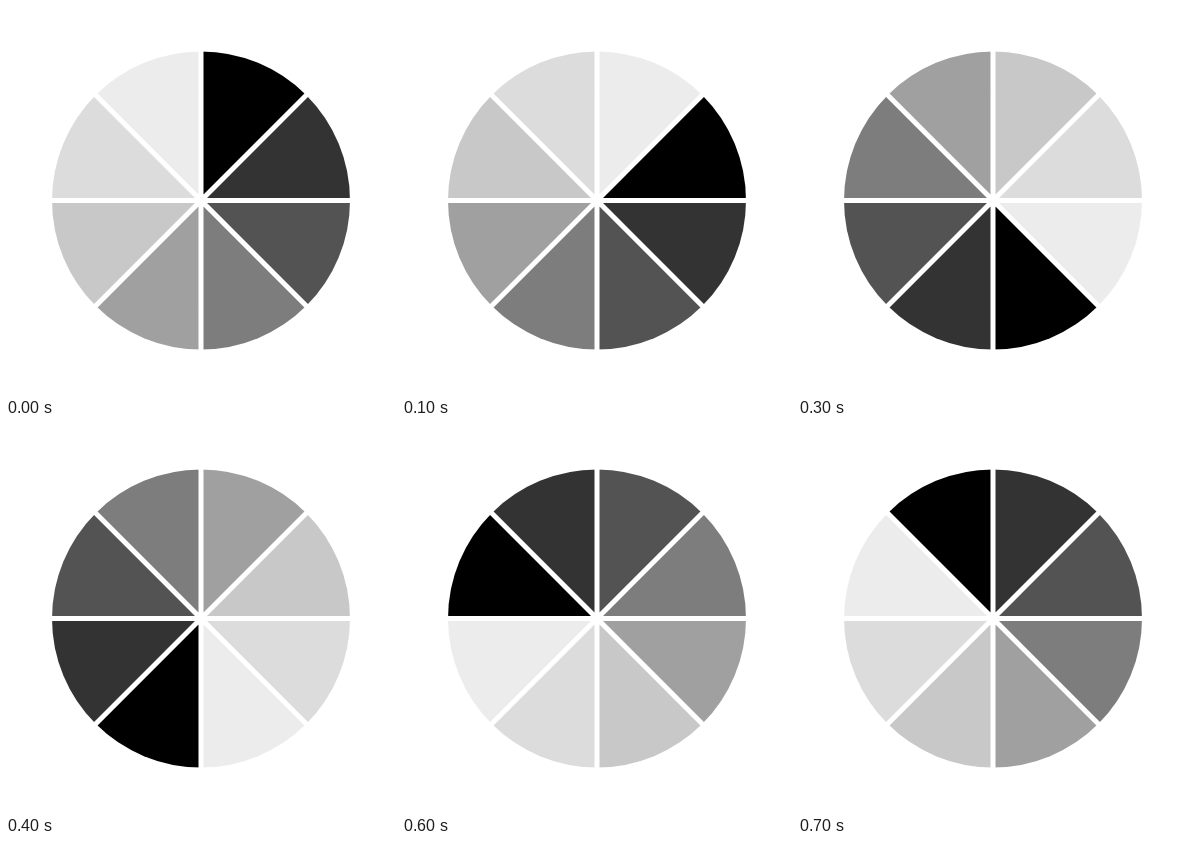
These frames come from a looping animation (390x390 px, 800 ms). An HTML page with a canvas:

```html
<!DOCTYPE html>
<html lang="en">
<head>
<meta charset="utf-8">
<title>Spinner</title>
<style>
  html, body { margin: 0; width: 100%; height: 100%; overflow: hidden; background: #fff; }
  canvas { display: block; }
</style>
</head>
<body>
<canvas id="stage" width="390" height="390"></canvas>
<script>
const ctx = document.getElementById('stage').getContext('2d');
const SHADES = [0, 51, 83, 125, 160, 200, 220, 236];
const COUNT = SHADES.length;
const STEP_MS = 100;
const CX = 195, CY = 194.5, RADIUS = 149, GAP = 5;
const SLICE = Math.PI * 2 / COUNT;

function drawSlice(i, shade) {
  const start = i * SLICE - Math.PI / 2;
  ctx.fillStyle = `rgb(${shade}, ${shade}, ${shade})`;
  ctx.beginPath();
  ctx.moveTo(CX, CY);
  ctx.arc(CX, CY, RADIUS, start, start + SLICE);
  ctx.fill();
}

function drawGaps() {
  ctx.strokeStyle = '#fff';
  ctx.lineWidth = GAP;
  ctx.beginPath();
  for (let i = 0; i < COUNT / 2; i++) {
    const dx = Math.cos(i * SLICE) * (RADIUS + 4);
    const dy = Math.sin(i * SLICE) * (RADIUS + 4);
    ctx.moveTo(CX - dx, CY - dy);
    ctx.lineTo(CX + dx, CY + dy);
  }
  ctx.stroke();
}

function draw(step) {
  ctx.fillStyle = '#fff';
  ctx.fillRect(0, 0, 390, 390);
  for (let i = 0; i < COUNT; i++) {
    drawSlice(i, SHADES[(i - step + COUNT) % COUNT]);
  }
  drawGaps();
}

let origin = null;
function tick(now) {
  if (origin === null) origin = now;
  draw(Math.floor((now - origin) / STEP_MS) % COUNT);
  requestAnimationFrame(tick);
}
draw(0);
requestAnimationFrame(tick);
</script>
</body>
</html>
```
